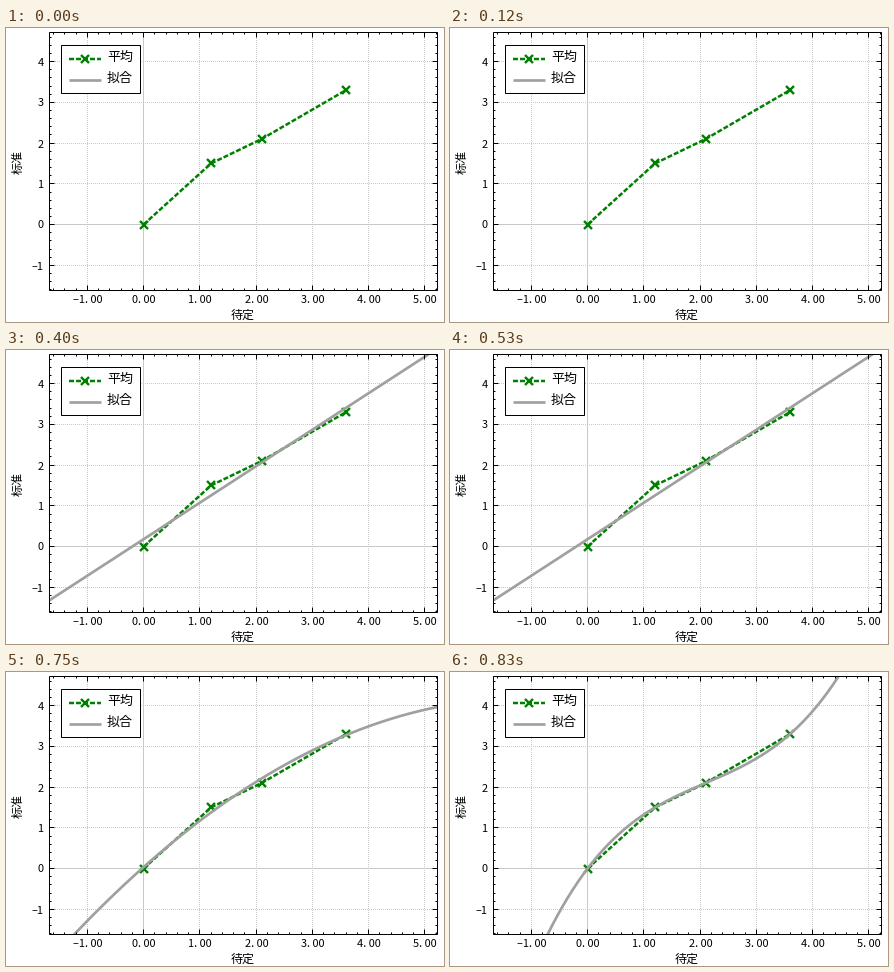
Write a matplotlib script that moves like this. It is 438 px wide and 294 px high and loops after 1020 ms.

```python
import numpy as np
import matplotlib.pyplot as plt
from matplotlib.animation import FuncAnimation
from matplotlib.patches import Rectangle

W, H, DPI = 438, 294, 100
PX = 72 / DPI
LEFT, RIGHT, TOP, BOTTOM = 43, 431, 4, 262
STEP = 10
LOOP = 1020
# (start in ms, degree of the fitted polynomial; 0 means no fit)
STAGES = [(0, 0), (200, 2), (400, 1), (620, 2), (830, 3)]
GREEN, GREY, GRID = "#008000", "#a0a0a0", "#c8c8c8"

xs = np.array([0, 1.2, 2.1, 3.6])
ys = np.array([0, 1.5, 2.1, 3.3])

plt.rcParams["lines.scale_dashes"] = False

fig = plt.figure(figsize=(W / DPI, H / DPI), dpi=DPI, facecolor="white")
ax = fig.add_axes([0, 0, 1, 1])
ax.set_xlim(0, W)
ax.set_ylim(H, 0)
ax.axis("off")


def px(x):
    return 137.5 + 56.25 * np.asarray(x)


def py(y):
    return 196.6 - 40.75 * np.asarray(y)


def line(x, y, color, width=1, z=1, dashes=None, offset=0):
    style = (offset * PX, [d * PX for d in dashes]) if dashes else "-"
    return ax.plot(x, y, color=color, lw=width * PX, ls=style, zorder=z,
                   dash_capstyle="butt", solid_capstyle="butt")[0]


def label(x, y, text, size, **kw):
    kw = {"ha": "center", "va": "center_baseline", **kw}
    ax.text(x, y, text, fontsize=size * PX, family="Noto Sans CJK JP",
            color="black", zorder=9, **kw)


def number(x, y, text, **kw):
    label(x, y, text.replace("-", "–").replace(".", ". "), 11, **kw)


def frame_box(x0, y0, x1, y1, z, fill="none"):
    ax.add_patch(Rectangle((x0, y0), x1 - x0, y1 - y0, fc=fill, ec="black",
                           lw=PX, zorder=z, snap=True))


def grid_line(x, y, value):
    # The half-pixel offset puts every dot on a whole pixel
    line(x, y, GRID, dashes=(1, 1) if value else None, offset=0.5)


def average(x, y, z):
    line(x, y, GREEN, 2.5, z, (5, 2))


def crosses(x, y, z):
    ax.plot(x, y, ls="none", marker="x", ms=7.5 * PX, mew=2.4 * PX,
            color=GREEN, zorder=z)


def x_tick(x, size):
    for edge, d in ((BOTTOM, -size), (TOP, size)):
        line([x, x], [edge, edge + d], "black", z=6)


def y_tick(y, size):
    for edge, d in ((LEFT, size), (RIGHT, -size)):
        line([edge, edge + d], [y, y], "black", z=6)


# Grid, ticks and tick labels
for v in range(-1, 6):
    x = int(px(v))
    grid_line([x, x], [BOTTOM, TOP], v)
    x_tick(x, 5)
    number(x + 0.5, 271, f"{v:.2f}")
for v in range(-1, 5):
    y = int(py(v))
    grid_line([LEFT, RIGHT], [y, y], v)
    y_tick(y, 5)
    number(37.5, y + 0.5, str(v), ha="right")
for k in range(-8, 27):
    x_tick(int(px(k / 5)), 2)
for k in range(-8, 24):
    y_tick(int(py(k / 5)), 2)
frame_box(LEFT, TOP, RIGHT, BOTTOM, 6)

label(237, 285.5, "待定", 12)
label(12.5, 133.5, "标准", 12, rotation=90, va="center")

# Data and fitted curve
average(px(xs), py(ys), 3)
crosses(px(xs), py(ys), 4)
fit = line([], [], GREY, 2.7, 5)
fit.set_clip_path(Rectangle((LEFT, TOP), RIGHT - LEFT, BOTTOM - TOP,
                            transform=ax.transData))

# Legend
frame_box(55, 17, 134, 65, 7, "white")
average([63, 95], [31, 31], 8)
crosses([79], [31], 8)
line([63, 95], [52, 52], GREY, 2.7, 8)
label(114, 27.8, "平均", 13)
label(114, 48.8, "拟合", 13)

curve_x = np.linspace(-1.8, 5.4, 400)


def update(i):
    degree = [d for start, d in STAGES if start <= i * STEP][-1]
    if degree:
        curve_y = np.polyval(np.polyfit(xs, ys, degree), curve_x)
        fit.set_data(px(curve_x), py(curve_y))
    else:
        fit.set_data([], [])
    return [fit]


anim = FuncAnimation(fig, update, frames=LOOP // STEP, interval=STEP,
                     repeat=True, repeat_delay=0)
plt.show()
```
